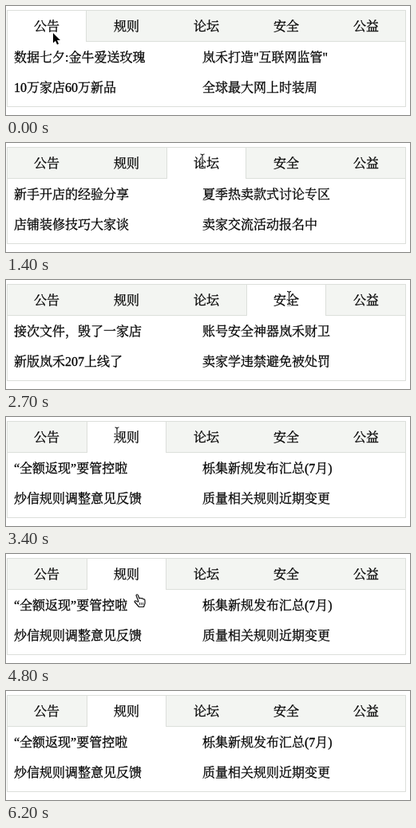
An HTML page with a canvas that plays this animation: 506 px wide and 137 px high, repeating every 6.3 s.

```html
<!DOCTYPE html>
<html lang="zh-CN">
<head>
<meta charset="utf-8">
<style>
html, body { margin: 0; width: 100%; height: 100%; overflow: hidden; background: #fff; }
canvas { display: block; width: 506px; height: 137px; }
</style>
</head>
<body>
<canvas id="stage"></canvas>
<script>
const W = 506, H = 137, LOOP = 6300, STEP = 100, EXIT = 5800;
const TAB = 100, BAR_TOP = 6, BAR_END = 44;
const LINE = '#dcdfdb', BAR = '#f3f5f2', INK = '#000';
const FONT = '16px "Liberation Serif", "Noto Serif CJK SC", "Noto Sans CJK SC", "Noto Sans CJK", serif';

const canvas = document.getElementById('stage');
const ctx = canvas.getContext('2d');
const ratio = window.devicePixelRatio || 1;
canvas.width = W * ratio;
canvas.height = H * ratio;

// Each tab: title, then left and right links of both rows
const tabs = [
  ['公告', '数据七夕:金牛爱送玫瑰', '岚禾打造"互联网监管"', '10万家店60万新品', '全球最大网上时装周'],
  ['规则', '“全额返现”要管控啦', '栎集新规发布汇总(7月)', '炒信规则调整意见反馈', '质量相关规则近期变更'],
  ['论坛', '新手开店的经验分享', '夏季热卖款式讨论专区', '店铺装修技巧大家谈', '卖家交流活动报名中'],
  ['安全', '接次文件，毁了一家店', '账号安全神器岚禾财卫', '新版岚禾207上线了', '卖家学违禁避免被处罚'],
  ['公益', '爱心书包送到山区啦', '每笔订单都是一份爱心', '公益店铺申请已开放', '一起来关爱留守儿童']
];

// Pointer stops: time, x, y
const stops = [[0, 59, 34], [200, 149, 22], [800, 149, 22], [1200, 246, 22], [1400, 246, 22],
  [2000, 391, 17], [2200, 447, 23], [2400, 447, 23], [3400, 139, 21], [3800, 50, 24],
  [4300, 97, 38], [4500, 130, 4], [4800, 160, 50], [5200, 288, 68], [5400, 418, 64],
  [EXIT, 490, 110]];

function pointerAt(t) {
  const i = stops.findIndex(s => s[0] > t);
  const [t0, x0, y0] = stops[i - 1], [t1, x1, y1] = stops[i];
  const k = (t - t0) / (t1 - t0);
  return { x: x0 + (x1 - x0) * k, y: y0 + (y1 - y0) * k };
}

// The tab that was hovered last stays open
function activeAt(t) {
  for (let s = Math.min(t, EXIT - STEP); s > 0; s -= STEP) {
    const { x, y } = pointerAt(s);
    if (y > BAR_TOP && y < BAR_END) return Math.floor((x - 1) / TAB);
  }
  return 0;
}

function rect(color, x, y, w, h) {
  ctx.fillStyle = color;
  ctx.fillRect(x, y, w, h);
}

function outline(path, color, width) {
  ctx.strokeStyle = color;
  ctx.lineWidth = width;
  ctx.stroke(path);
}

function arrow() {
  const shape = new Path2D('M0 0V12.5L3 9.8 5 14.5 7 13.6 5 9H9Z');
  outline(shape, '#fff', 2);
  ctx.fillStyle = '#000';
  ctx.fill(shape);
}

function beam() {
  const shape = new Path2D('M-2.5-8Q0-8 0-6Q0-8 2.5-8M0-6V6M-2.5 8Q0 8 0 6Q0 8 2.5 8M-1.5 3H1.5');
  outline(shape, '#fff', 3);
  outline(shape, '#111', 1.1);
}

function hand() {
  const shape = new Path2D('M6 10L3 2Q4-.5 5.5 2L7 6Q8 4.5 9.5 6Q11 5 12 7Q14 6 14 9V12L12.5 16.5H6.5L1 10Q1 7.5 4.5 10Z');
  ctx.fillStyle = '#fff';
  ctx.fill(shape);
  outline(shape, '#111', 1.2);
  outline(new Path2D('M7.5 11v3m2-3v3m2-3v3'), '#111', 0.8);
}

function drawPointer({ x, y }) {
  const overTitle = Math.abs(x % TAB - 51) < 17 && Math.abs(y - 23) < 9;
  const shape = y > BAR_END ? hand : overTitle ? beam : arrow;
  ctx.save();
  ctx.translate(x, y);
  ctx.lineJoin = 'round';
  shape();
  ctx.restore();
}

function write(text, x, y) {
  ctx.fillText(text, x, y);
  ctx.strokeText(text, x, y);
}

function drawPanel(active) {
  rect(LINE, 1, 5, 500, 122);
  rect('#fff', 2, BAR_TOP, 498, 120);
  rect(BAR, 2, BAR_TOP, 498, 38);
  rect(LINE, 2, BAR_END, 498, 1);

  const left = active * TAB + 1;
  rect(LINE, left, BAR_TOP, TAB, 39);
  rect('#fff', left + 1, BAR_TOP, TAB - 2, 39);

  // A hairline stroke gives the text its slightly heavier weight
  ctx.font = FONT;
  ctx.fillStyle = ctx.strokeStyle = INK;
  ctx.lineWidth = 0.3;
  tabs.forEach((tab, i) => write(tab[0], 35 + i * TAB, 31));
  tabs[active].slice(1).forEach((text, i) =>
    write(text, i % 2 ? 246 : 10, i < 2 ? 70 : 108));
}

function draw(now) {
  const t = Math.floor((now % LOOP) / STEP) * STEP;
  ctx.setTransform(ratio, 0, 0, ratio, 0, 0);
  rect('#fff', 0, 0, W, H);
  drawPanel(activeAt(t));
  if (t < EXIT) drawPointer(pointerAt(t));
}

let start;
function tick(now) {
  start ??= now;
  draw(now - start);
  requestAnimationFrame(tick);
}
draw(0);
requestAnimationFrame(tick);
</script>
</body>
</html>
```
